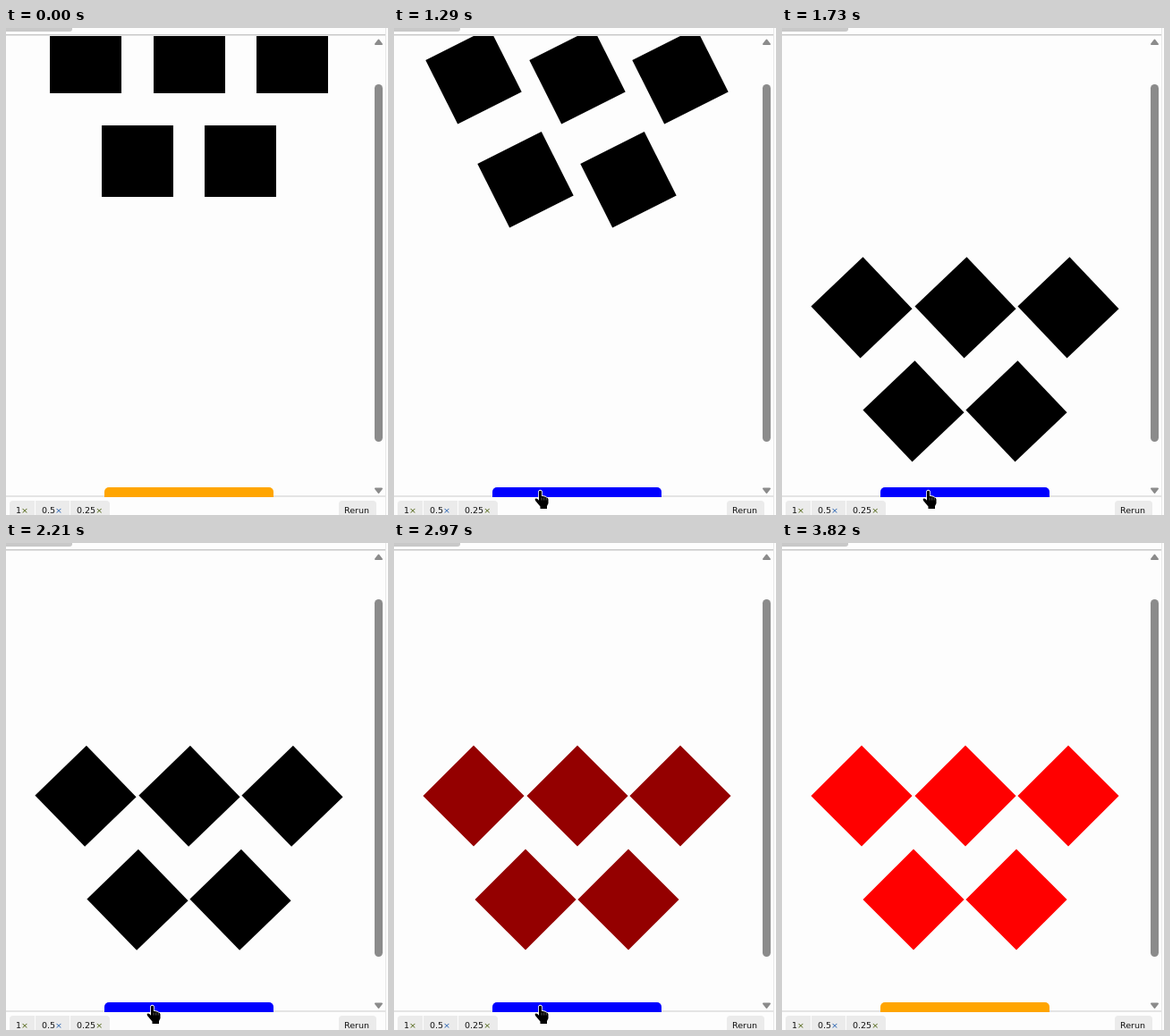
An HTML page with a canvas that plays this animation: 427 px wide and 545 px high, repeating every 4270 ms.

```html
<!DOCTYPE html>
<html lang="en">
<head>
<meta charset="utf-8">
<title>Elastic squares</title>
<style>
  html, body { margin: 0; width: 100%; height: 100%; overflow: hidden; background: #fdfdfd; }
  canvas { display: block; }
</style>
</head>
<body>
<canvas id="stage" width="427" height="545"></canvas>
<script>
const W = 427, H = 545, LOOP = 4270, TICK = 40;
const LAUNCH = 1290;
const DURATION = 1500, DROP = 250, SPIN = 765;
const SQUARES = [[89, 33], [205, 33], [320, 33], [147, 149], [262, 149]];

// Clock of the elastic move: [time, elapsed]
const CLOCK = [[1290, 16.6], [1730, 433], [2210, 949], [2773, DURATION]];
// Pointer offset from its resting place: [time, value]
const POINTER_X = [[160, 9], [640, 0], [3540, 0], [3820, -9]];
const POINTER_Y = [[160, -3], [280, -8], [640, -1], [1009, -1], [1010, 0], [3500, 0], [3820, 28]];

const ctx = document.getElementById('stage').getContext('2d');

function track(keys, t) {
  if (t <= keys[0][0]) return keys[0][1];
  for (let i = 1; i < keys.length; i++) {
    const [t0, v0] = keys[i - 1], [t1, v1] = keys[i];
    if (t <= t1) return v0 + (v1 - v0) * (t - t0) / (t1 - t0);
  }
  return keys[keys.length - 1][1];
}

function elastic(p) {
  if (p <= 0) return 0;
  if (p >= 1) return 1;
  return 1 - Math.pow(2, -10 * p) * Math.cos(4 * Math.PI * p);
}

function rect(x, y, w, h, color, radii = 0) {
  ctx.fillStyle = color;
  ctx.beginPath();
  ctx.roundRect(x, y, w, h, radii);
  ctx.fill();
}

function label(text, x, color = '#111') {
  ctx.fillStyle = color;
  ctx.fillText(text, x, 543);
  return x + ctx.measureText(text).width;
}

function drawSquares(t) {
  const step = LAUNCH + Math.floor((t - LAUNCH) / TICK) * TICK;
  const f = t < LAUNCH ? 0 : elastic(track(CLOCK, step) / DURATION);
  const fade = Math.min(1, Math.max(0, (step - 2646) / 425));
  ctx.fillStyle = `rgb(${Math.round(255 * fade * fade)},0,0)`;
  for (const [x, y] of SQUARES) {
    ctx.save();
    ctx.translate(x, y + DROP * f);
    ctx.rotate(SPIN * f * Math.PI / 180);
    ctx.fillRect(-40, -40, 80, 80);
    ctx.restore();
  }
}

function arrow(y, dir) {
  ctx.fillStyle = ctx.strokeStyle = '#8b8b8b';
  ctx.lineWidth = 2;
  ctx.lineJoin = 'round';
  ctx.beginPath();
  ctx.moveTo(416.5, y - 2.5 * dir);
  ctx.lineTo(420, y + 2 * dir);
  ctx.lineTo(413, y + 2 * dir);
  ctx.closePath();
  ctx.fill();
  ctx.stroke();
}

function drawHeader() {
  rect(0, 0, W, 7, '#fdfdfd');
  rect(0, 0, 74, 4, '#c8c8c8', [0, 0, 3, 0]);
  rect(0, 7, 424, 1, '#c6c6c6');
  rect(0, 8, 424, 1, '#e6e6e6');
}

function drawScrollbar() {
  rect(412, 63, 9, 400, '#8b8b8b', 4.5);
  arrow(16, 1);
  arrow(517.5, -1);
  rect(424, 0, 1, H, '#e8e8e8');
}

function drawFooter(hover) {
  rect(0, 523, 424, 2, '#e4e4e4');
  rect(110, 514, 189, 11, hover ? '#0000ff' : '#ffa500', [5, 5, 0, 0]);
  rect(0, 525, 424, 20, '#fdfdfd');
  rect(4, 529, 112, 16, '#ebebeb', [4, 4, 0, 0]);
  rect(32, 529, 1, 16, '#fdfdfd');
  rect(71, 529, 1, 16, '#fdfdfd');
  rect(372, 529, 42, 16, '#ebebeb', [4, 4, 0, 0]);
  ctx.font = '9.5px "DejaVu Sans", Verdana, sans-serif';
  label('×', label('1', 11), '#566a1c');
  label('×', label('0.5', 40), '#2f68b4');
  label('×', label('0.25', 79), '#566a1c');
  label('Rerun', 378);
}

const hand = new Path2D(
  'M5.5 1.5 Q7 -.2 8.5 1.5 V7 Q10.5 6.2 11.2 7.6 Q13 7 13.7 8.6 ' +
  'Q15.8 8.4 16 10.5 V15 L14.5 18 V21 H7 V18.5 L2.6 13.2 Q0 10.6 2 9.6 ' +
  'Q3.6 9.2 5.5 11.8 Z');

function drawHand(x, y) {
  ctx.save();
  ctx.translate(x, y);
  ctx.lineWidth = 1.6;
  ctx.lineJoin = 'round';
  ctx.strokeStyle = '#fff';
  ctx.stroke(hand);
  ctx.fillStyle = '#000';
  ctx.fill(hand);
  ctx.lineWidth = 0.5;
  ctx.strokeStyle = '#aaa';
  ctx.beginPath();
  for (const gx of [8.6, 11.2, 13.7]) {
    ctx.moveTo(gx, 8.5);
    ctx.lineTo(gx, 11.5);
  }
  ctx.stroke();
  ctx.restore();
}

function draw(t) {
  const present = t >= 160 && t < 3820;
  const dy = track(POINTER_Y, t);
  rect(0, 0, W, H, '#fdfdfd');
  drawSquares(t);
  drawHeader();
  drawScrollbar();
  drawFooter(present && dy < 8);
  if (present) drawHand(156.5 + track(POINTER_X, t), 517 + dy);
}

const start = performance.now();
function loop() {
  draw((performance.now() - start) % LOOP);
  requestAnimationFrame(loop);
}
loop();
</script>
</body>
</html>
```
